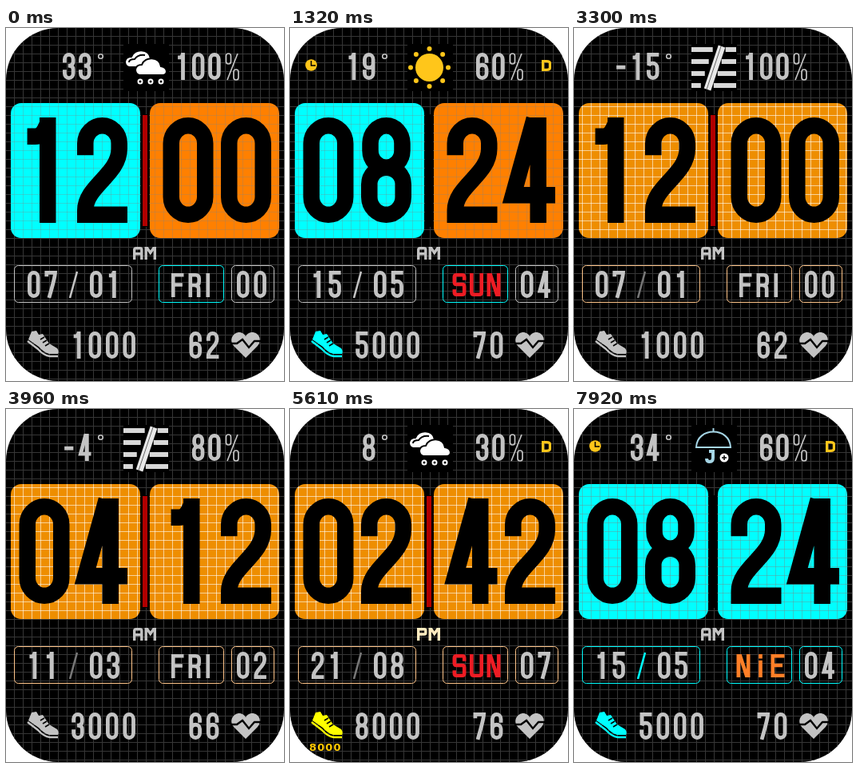
Write an HTML page that moves like this. It is 348 by 442 pixels and loops after 8 s.

```html
<!DOCTYPE html>
<html lang="en">
<head>
<meta charset="utf-8">
<title>Watch face</title>
<style>
html, body { margin: 0; width: 100%; height: 100%; overflow: hidden; background: #fff; }
svg { display: block; width: 348px; height: 442px; }
.glyph { fill: none; stroke-linecap: square; vector-effect: non-scaling-stroke; }
text { font-family: "DejaVu Sans", sans-serif; font-weight: bold; }
</style>
</head>
<body>
<svg viewBox="0 0 348 442"></svg>
<script>
const STEP = 330, LOOP = 8000;
const GREY = '#c3c3c3', YELLOW = '#ffc61a', CYAN = '#00ffff';

// Condensed letterforms as centre lines in a 100 x 100 box.
const GLYPHS = {
  0: 'M0 20A50 20 0 0 1 100 20V80A50 20 0 0 1 0 80Z',
  1: 'M100 100V0M0 12Q50 12 78 4',
  2: 'M0 24V20A50 20 0 0 1 100 20V26C100 55 0 68 0 95V100H100',
  3: 'M0 26V20A50 20 0 0 1 100 20V30Q100 47 40 47Q100 47 100 63V80A50 20 0 0 1 0 80V73',
  4: 'M74 0V100M56 1L0 78H100',
  5: 'M98 0H3V46Q15 37 50 37A50 20 0 0 1 100 57V80A50 20 0 0 1 0 80V74',
  6: 'M100 27V20A50 20 0 0 0 0 20V80A50 20 0 0 0 100 80V62A50 18 0 0 0 0 62',
  7: 'M0 8V0H100Q98 20 35 100',
  8: 'M3 20A47 20 0 0 1 97 20V28A47 19 0 0 1 3 28ZM0 66A50 19 0 0 1 100 66V80A50 20 0 0 1 0 80Z',
  9: 'M0 73V80A50 20 0 0 0 100 80V20A50 20 0 0 0 0 20V38A50 18 0 0 0 100 38',
  '-': 'M20 54H80',
  F: 'M100 0H0V100M0 48H85',
  R: 'M0 100V0H60Q100 0 100 18V32Q100 50 60 50H0M60 50Q95 50 95 70V100',
  I: 'M50 0V100',
  T: 'M0 0H100M50 0V100',
  W: 'M0 0L22 100L50 30L78 100L100 0',
  E: 'M100 0H0V100H100M0 48H80',
  D: 'M0 0V100H50Q100 100 100 78V22Q100 0 50 0Z',
  S: 'M100 17V10Q100 0 80 0H20Q0 0 0 10V37Q0 48 20 48H80Q100 48 100 59V90Q100 100 80 100H20Q0 100 0 90V83',
  U: 'M0 0V88Q0 100 22 100H78Q100 100 100 88V0',
  N: 'M0 100V0H18L82 100H100V0',
  P: 'M0 100V0H80Q100 0 100 12V38Q100 50 80 50H28',
  i: 'M50 32V100M50 0V4',
  A: 'M0 100V14Q0 0 25 0H75Q100 0 100 14V100M0 56H100',
  M: 'M0 100V0H15L50 45L85 0H100V100',
  O: 'M20 0H80Q100 0 100 12V88Q100 100 80 100H20Q0 100 0 88V12Q0 0 20 0Z'
};

const THEMES = [
  { panels: [CYAN, '#ff8000'], boxes: [GREY, CYAN, GREY], slash: GREY, grid: '#8080804d' },
  { panels: ['#ee8e00', '#ee8e00'], boxes: ['#ffc58a', '#ffc58a', '#ffc58a'], slash: '#777', grid: '#ffffff99' },
  { panels: [CYAN, CYAN], boxes: [CYAN, CYAN, CYAN], slash: CYAN, grid: '#80808066' }
];
const WEEKDAYS = 'FRI WED FRI WED SUN FRI TUE SUN FRI TUE'.split(' ');
const LOCAL_DAYS = { FRI: 'PiA', WED: 'SRO', SUN: 'NiE', TUE: 'WTO' };

const TEMPS = [33, 27, 24, 22, 19, 16, 13, 10, 4, -6, -15, -9, -4, 2, -12, -8, 3, 8, 12, 9, 5, 14, 21, 28, 34];
// r rain, s sun, w wind, p part sun, n snow, u umbrella
const WEATHER = 'rrswsprswrwrwpnnrrssprwwu';

const path = (d, stroke, width = 1, fill = 'none') =>
  `<path d="${d}" stroke="${stroke}" stroke-width="${width}" fill="${fill}"/>`;
const disc = (x, y, r, fill, stroke = 'none', width = 0) =>
  `<circle cx="${x}" cy="${y}" r="${r}" fill="${fill}" stroke="${stroke}" stroke-width="${width}"/>`;
const rect = (x, y, w, h, r, fill, stroke = 'none') =>
  `<rect x="${x}" y="${y}" width="${w}" height="${h}" rx="${r}" fill="${fill}" stroke="${stroke}"/>`;

function glyph(ch, x, y, w, h, weight, color = GREY) {
  if (ch === '1') { x += w * .16; w *= .57; }
  return `<path class="glyph" d="${GLYPHS[ch]}" stroke="${color}" stroke-width="${weight}" transform="translate(${x + weight / 2} ${y + weight / 2}) scale(${(w - weight) / 100} ${(h - weight) / 100})"/>`;
}

function small(value, x, y, pitch = 21.4) {
  return [...String(value)].map((ch, i) => glyph(ch, x + i * pitch, y, 15.5, 34, 4.8)).join('');
}

function big(value, x) {
  return [...value].map((ch, i) => glyph(ch, x + i * 72.5, 112, 63, 132, 20.5, '#000')).join('');
}

function gridLines(pitch) {
  let d = '';
  for (let x = pitch - .5; x < 348; x += pitch) d += `M${x} 0V442`;
  for (let y = pitch - .5; y < 442; y += pitch) d += `M0 ${y}H348`;
  return d;
}
const GRID = gridLines(11);

function sun(x, y, r, reach) {
  let out = disc(x, y, r, YELLOW);
  for (let k = 0; k < 8; k++) {
    const a = k * Math.PI / 4;
    out += disc(x + reach * Math.cos(a), y + reach * Math.sin(a), 3, YELLOW);
  }
  return out;
}

const cloud = (x, y) =>
  path(`M${x + 5} ${y + 21}Q${x} ${y + 20} ${x} ${y + 14}Q${x + 1} ${y + 8} ${x + 8} ${y + 8}` +
    `C${x + 12} ${y - 3} ${x + 30} ${y - 2} ${x + 32} ${y + 10}Q${x + 39} ${y + 11} ${x + 39} ${y + 17}` +
    `Q${x + 38} ${y + 21} ${x + 34} ${y + 21}Z`, '#000', 2, '#fff');

function windRows() {
  let out = '';
  for (let y = 27; y < 77; y += 15) {
    const edge = 184 - (y - 23) * .33;
    out += path(`M147 ${y}H${edge - 9}M${edge + 7} ${y}H203`, '#d8d8d8', 6);
  }
  return out + path('M185 23L167 77', '#e8e8e8', 9) + path('M184 23L166 77', '#666', 1);
}

function snowflake() {
  let out = '';
  for (let k = 0; k < 8; k++) {
    const a = k * Math.PI / 4, at = r => `${175 + r * Math.cos(a)} ${51 + r * Math.sin(a)}`;
    out += path(`M${at(2)}L${at(14)}`, '#ddd', 3.4) + path(`M${at(16)}L${at(20)}`, '#ddd', 4);
  }
  return out;
}

const ICONS = {
  r: () => cloud(149, 28) + path('M154 43Q154 39 161 39Q165 33 174 34', '#000', 2) + cloud(162, 38) +
    [168, 181, 194].map(x => disc(x, 67, 2.5, 'none', '#fff', 2)).join(''),
  s: () => sun(174.5, 49.5, 17.5, 23.5),
  w: windRows,
  p: () => sun(171, 43.5, 14, 21) + cloud(167, 46),
  n: snowflake,
  u: () => path('M153 48C154 22 195 22 196 48Z', '#a5d5e5', 2) + path('M174.5 28V24', '#a5d5e5', 2) +
    path('M166 62Q166 66 170 66Q174 66 174 61V53H169', '#a5d5e5', 4) + disc(188, 61, 5.5, '#fff') +
    path('M185 61H191M188 58V64', '#000', 1.5)
};

function percent() {
  return path('M290 32L277 65', GREY, 1.7) +
    `<g fill="none" stroke="${GREY}" stroke-width="1.7"><rect x="275.5" y="32" width="6" height="13" rx="3"/><rect x="285" y="52" width="6" height="13" rx="3"/></g>`;
}

function shoe(color) {
  return path('M32 380L38 379L41 384L46 383L54 395L64 401Q67 405 65 408H54Q47 406 41 399L28 390Z', 'none', 0, color) +
    path('M27 392L40 402Q47 410 55 411H65', color, 2.4) +
    path('M43 390L48 387M46 394L51 391M49 398L54 395', '#000', 1.6);
}

function heart() {
  return path('M300 413L285 398C278 389 286 380 293 381Q298 382 300 386Q302 382 307 381C315 380 322 389 315 398Z', 'none', 0, GREY) +
    path('M281 395H289L296 390L304 400L311 392H319', '#000', 2.4);
}

function weekday(name, local) {
  const sunday = name === 'SUN';
  const word = local ? LOCAL_DAYS[name] : name;
  const color = sunday ? (local ? '#ff7f27' : '#ed1c24') : GREY;
  const square = local || sunday;
  return [...word].map((ch, i) => square
    ? glyph(ch, 203.5 + i * 21.5, 307, 17, 29, sunday ? 4.6 : 3.8, color)
    : glyph(ch, (ch === 'I' ? 202 : 207) + i * 21.5, 307, 15.5, 30, 4.6, color)).join('') +
    (word === 'PiA' ? path('M259 334V339H262', color, 2) : '') +
    (word === 'SRO' ? path('M211 305L215 301', color, 2) : '');
}

function face(tick) {
  const n = tick % 10, theme = THEMES[Math.floor(tick / 10)];
  const pad = v => String(v).padStart(2, '0');
  const temp = String(TEMPS[tick]), battery = String(100 - 10 * n), steps = String(1000 * (n + 1));
  const alarm = n >= 3 && n <= 5, quiet = n >= 3, afternoon = n >= 6;
  const panels = (left, right) => rect(6, 94, 162, 169, 13, left) + rect(180, 94, 162, 169, 13, right);
  const shoeColor = n < 4 ? GREY : n < 6 ? CYAN : '#ffff00';
  const noonColor = afternoon ? '#ffecc0' : GREY;
  const [dateEdge, dayEdge, numEdge] = theme.boxes;

  return `<clipPath id="panels">${panels('#000', '#000')}</clipPath>` +
    `<clipPath id="body">${rect(0, 0, 348, 442, 65, '#000')}</clipPath>` +
    `<g clip-path="url(#body)">${rect(0, 0, 348, 442, 0, '#000')}${path(GRID, '#363636')}</g>` +
    panels(...theme.panels) +
    `<g clip-path="url(#panels)">${path(GRID, theme.grid)}</g>` +
    rect(169, 108, 10, 141, 0, '#000') + (alarm ? '' : rect(171, 109, 6, 139, 0, '#b00000')) +
    big(pad(2 * n % 12 || 12), 16.5) + big(pad(6 * n), 196.5) +

    small(temp, 111 - temp.length * 20, 31, 20) + disc(118.5, 35.5, 2.8, 'none', GREY, 1.6) +
    rect(147, 20, 57, 59, 0, '#000') + ICONS[WEATHER[tick]]() +
    small(battery, 273.5 - battery.length * 20.3, 31, 20.3) + percent() +
    (alarm ? disc(26.5, 46.5, 7.3, YELLOW) + path('M26.5 41V47H32', '#000', 1.5) : '') +
    (quiet ? glyph('D', 315, 40, 12, 14, 3.2, YELLOW) : '') +

    glyph(afternoon ? 'P' : 'A', 159, 274, 12.5, 16, 3.4, noonColor) +
    glyph('M', 173.5, 274, 14.5, 16, 3.4, noonColor) +

    rect(10.5, 297.5, 147, 46, 5, 'none', dateEdge) +
    rect(191.5, 297.5, 81, 46, 5, 'none', dayEdge) +
    rect(282.5, 297.5, 53, 46, 5, 'none', numEdge) +
    small(pad(7 + 2 * n), 27, 304) + path('M89 305L80 338', theme.slash, 2.6) + small(pad(n + 1), 105, 304) +
    weekday(WEEKDAYS[n], tick >= 20) + small(pad(n), 289, 304) +

    shoe(shoeColor) + small(steps, 125 - steps.length * 10.7, 380) +
    (n >= 7 ? '<text x="24" y="427.5" font-size="13" letter-spacing="1.1" fill="#ffc800">8000</text>' : '') +
    small(62 + 2 * n, 229.5, 380) + heart();
}

const stage = document.querySelector('svg');
let shown = -1;

function play() {
  const tick = Math.floor(performance.now() % LOOP / STEP);
  if (tick !== shown) {
    stage.innerHTML = face(tick);
    shown = tick;
  }
  requestAnimationFrame(play);
}
play();
</script>
</body>
</html>
```
